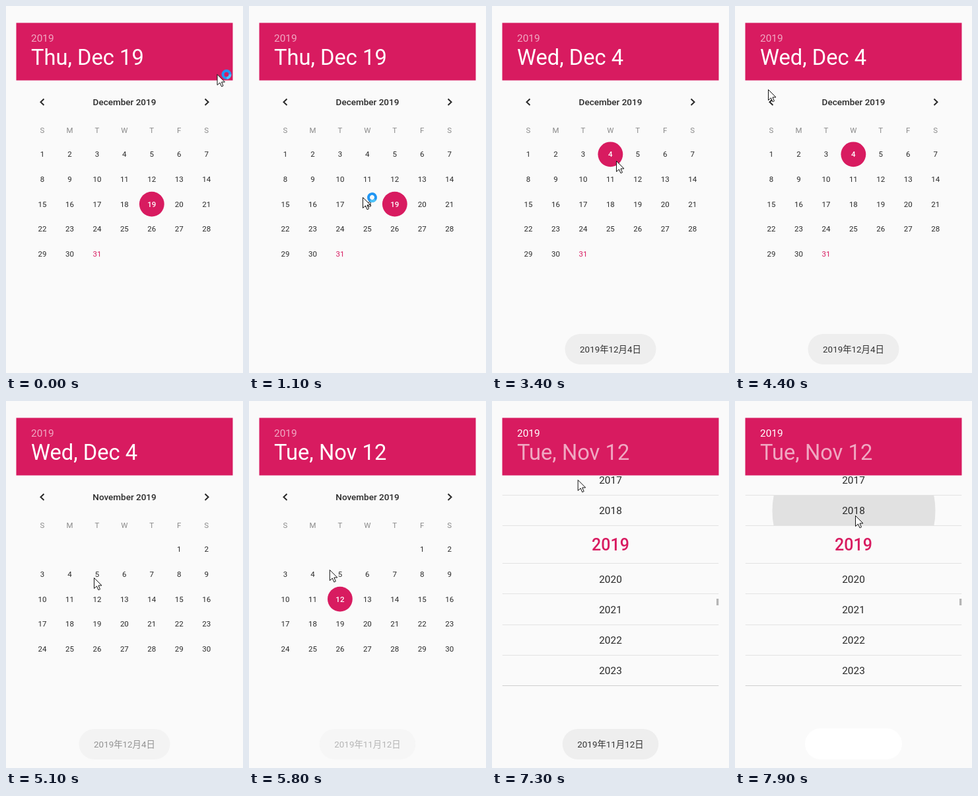
An HTML page with a canvas that plays this animation: 359x555 px, repeating every 8000 ms.

```html
<!DOCTYPE html>
<html lang="en">
<head>
<meta charset="utf-8">
<title>Date picker</title>
<style>
  html, body { margin: 0; width: 100%; height: 100%; overflow: hidden; background: #fafafa; }
  canvas { display: block; }
</style>
</head>
<body>
<canvas width="359" height="555"></canvas>
<script>
const ctx = document.querySelector('canvas').getContext('2d');
const LOOP = 8000, STEP = 100;
const PINK = '#d81b60', INK = '#2a2a2a', PAPER = '#fafafa';
const LEFT = 15.5, WIDTH = 328, TOP = 113;
const WEEKDAYS = ['Sun', 'Mon', 'Tue', 'Wed', 'Thu', 'Fri', 'Sat'];
const MONTHS = { 10: 'November', 11: 'December' };

// Chosen dates; every pick after the first shows a toast.
const picks = [
  { at: -1, month: 11, day: 19 },
  { at: 1600, month: 11, day: 18 },
  { at: 2900, month: 11, day: 4 },
  { at: 5600, month: 10, day: 12 }
];

// Pointer path: time, x, y
const path = [
  [0, 319.5, 103], [900, 187, 251], [1100, 172, 289], [1900, 172, 289],
  [2400, 171, 247], [2700, 188, 235], [3000, 188, 234], [3700, 188, 234],
  [4400, 50, 126], [4700, 50, 126], [5100, 133, 267], [5400, 133, 292],
  [5700, 133, 292], [6300, 66, 70], [6500, 60, 47], [6900, 60, 47],
  [7600, 182, 173], [8000, 182, 173]
];

const progress = (t, from, to) => Math.min(1, Math.max(0, (t - from) / (to - from)));
const mix = (a, b, k) => a + (b - a) * k;
const easeOut = k => 1 - (1 - k) ** 4;

function text(str, x, y, size, color, { weight = 400, align = 'center' } = {}) {
  ctx.font = `${weight} ${size}px Roboto, "Noto Sans CJK JP", "Noto Sans CJK SC", sans-serif`;
  ctx.textAlign = align;
  ctx.fillStyle = color;
  ctx.fillText(str, x, y + size * 0.355);
}

function disc(x, y, r, color) {
  ctx.fillStyle = color;
  ctx.beginPath();
  ctx.arc(x, y, r, 0, Math.PI * 2);
  ctx.fill();
}

function rect(x, y, w, h, color) {
  ctx.fillStyle = color;
  ctx.fillRect(x, y, w, h);
}

function pill(x, y, w, h, color) {
  ctx.fillStyle = color;
  ctx.beginPath();
  ctx.roundRect(x, y, w, h, h / 2);
  ctx.fill();
}

function clipped(x, y, w, h, alpha, draw) {
  ctx.save();
  ctx.beginPath();
  ctx.rect(x, y, w, h);
  ctx.clip();
  ctx.globalAlpha = alpha;
  draw();
  ctx.restore();
}

function drawHeader(t, pick) {
  const yearMode = t >= 6900;
  const faded = 'rgba(255,255,255,.62)';
  rect(LEFT, 25.5, WIDTH, 87, PINK);
  if (t >= 6700 && t < 7100) {
    const r = mix(9, 18, progress(t, 6700, 6800));
    disc(58, 49.5, r, `rgba(90,20,60,${0.2 * (1 - progress(t, 6850, 7100))})`);
  }
  const date = WEEKDAYS[new Date(2019, pick.month, pick.day).getDay()];
  text('2019', 38, 49, 15.4, yearMode ? '#fff' : faded, { align: 'left' });
  text(`${date}, ${MONTHS[pick.month].slice(0, 3)} ${pick.day}`, 38, 77, 32.7,
    yearMode ? faded : '#fff', { align: 'left' });
}

function drawMonth(month, offset, pick) {
  const column = i => 55 + i * 41.45 + offset;
  text(`${MONTHS[month]} 2019`, 179.5 + offset, 145, 13.5, INK, { weight: 500 });
  WEEKDAYS.forEach((name, i) => text(name[0], column(i), 188, 11.5, '#8a8a8a'));
  const first = new Date(2019, month, 1).getDay();
  const days = new Date(2019, month + 1, 0).getDate();
  for (let day = 1; day <= days; day++) {
    const cell = first + day - 1;
    const x = column(cell % 7), y = 224.3 + Math.floor(cell / 7) * 37.65;
    const selected = pick.month === month && pick.day === day;
    if (selected) disc(x, y, 18.9, PINK);
    const today = month === 11 && day === 31;
    text(day, x, y, 11.5, selected ? '#fff' : today ? PINK : INK, { weight: selected ? 500 : 400 });
  }
}

function chevron(x, dir) {
  ctx.strokeStyle = INK;
  ctx.lineWidth = 2;
  ctx.beginPath();
  ctx.moveTo(x + 2.5 * dir, 140.5);
  ctx.lineTo(x - 2.5 * dir, 145.3);
  ctx.lineTo(x + 2.5 * dir, 150);
  ctx.stroke();
}

function drawCalendar(t, pick) {
  const slide = easeOut(progress(t, 4550, 4980)) * WIDTH;
  if (t >= 4600 && t < 5100) {
    const r = 32 * Math.sqrt(progress(t, 4500, 4800));
    disc(55, 145, r, `rgba(0,0,0,${0.12 * (1 - progress(t, 4750, 5100))})`);
  }
  if (slide < WIDTH) drawMonth(11, slide, pick);
  if (slide > 0) drawMonth(10, slide - WIDTH, pick);
  chevron(55, 1);
  chevron(304, -1);
}

function drawYears(t) {
  const lines = [142, 188.5, 245.5, 291.5, 338, 384, 430.5];
  const ripple = progress(t, 7600, 7900);
  rect(LEFT, TOP, WIDTH, 318, PAPER);
  if (ripple > 0) {
    clipped(LEFT, 142, WIDTH, 46.5, 1, () => disc(180, 166, 123.5 * ripple, '#e1e1e1'));
  }
  lines.forEach((y, i) => {
    rect(LEFT, Math.floor(y), WIDTH, 1, i === 6 ? '#cfcfcf' : '#e3e3e3');
    const year = 2017 + i;
    const middle = i === 0 ? 119.5 : (lines[i - 1] + y) / 2 + 0.7;
    if (year === 2019) text(year, 179.5, 217.5, 25, PINK, { weight: 500 });
    else text(year, 179.5, middle, 15.4, INK);
  });
  rect(340, 299, 3.5, 10, '#b5b5b5');
}

function drawToasts(t) {
  if (t >= 7900) pill(106, 495, 147, 47, '#fff');
  picks.slice(1).forEach((pick, i) => {
    const next = picks[i + 2];
    const leave = Math.min(next ? next.at : LOOP, pick.at + 2100);
    const alpha = progress(t, pick.at + 100, pick.at + 400) * (1 - progress(t, leave, leave + 200));
    if (!alpha) return;
    const w = pick.day > 9 ? 145.5 : 138;
    ctx.globalAlpha = alpha;
    pill(179.5 - w / 2, 496, w, 46, '#eee');
    text(`2019年${pick.month + 1}月${pick.day}日`, 179.5, 519, 13.4, '#333');
    ctx.globalAlpha = 1;
  });
}

function drawPointer(t) {
  const i = path.findIndex(p => p[0] > t);
  const [t0, x0, y0] = path[i - 1], [t1, x1, y1] = path[i];
  const k = progress(t, t0, t1);
  const x = mix(x0, x1, k), y = mix(y0, y1, k);
  if (t < 1500) {
    const turn = t / 160;
    ctx.lineWidth = 4;
    for (const [color, length] of [['#2196f3', Math.PI * 2], ['#4fc3f7', 1.5]]) {
      ctx.strokeStyle = color;
      ctx.beginPath();
      ctx.arc(x + 14.5, y + 0.5, 5.5, turn, turn + length);
      ctx.stroke();
    }
  }
  ctx.save();
  ctx.translate(x + 0.5, y + 0.5);
  ctx.fillStyle = '#fff';
  ctx.strokeStyle = '#111';
  ctx.lineWidth = 1;
  ctx.fill(arrow);
  ctx.stroke(arrow);
  ctx.restore();
}
const arrow = new Path2D('M0 0V16L4 12.5L6.5 18.3L9 17.2L6.5 11.5H11.5Z');

function draw(now) {
  const t = Math.floor((now % LOOP) / STEP) * STEP;
  const pick = picks.findLast(p => p.at <= t);
  const years = progress(t, 6800, 7200);
  rect(0, 0, 359, 555, PAPER);
  drawHeader(t, pick);
  clipped(LEFT, TOP, WIDTH, 340, 1 - years, () => drawCalendar(t, pick));
  if (years) clipped(LEFT, TOP, WIDTH, 340, years, () => drawYears(t));
  drawToasts(t);
  drawPointer(t);
}

const start = performance.now();
function tick() {
  draw(performance.now() - start);
  requestAnimationFrame(tick);
}
tick();
</script>
</body>
</html>
```
